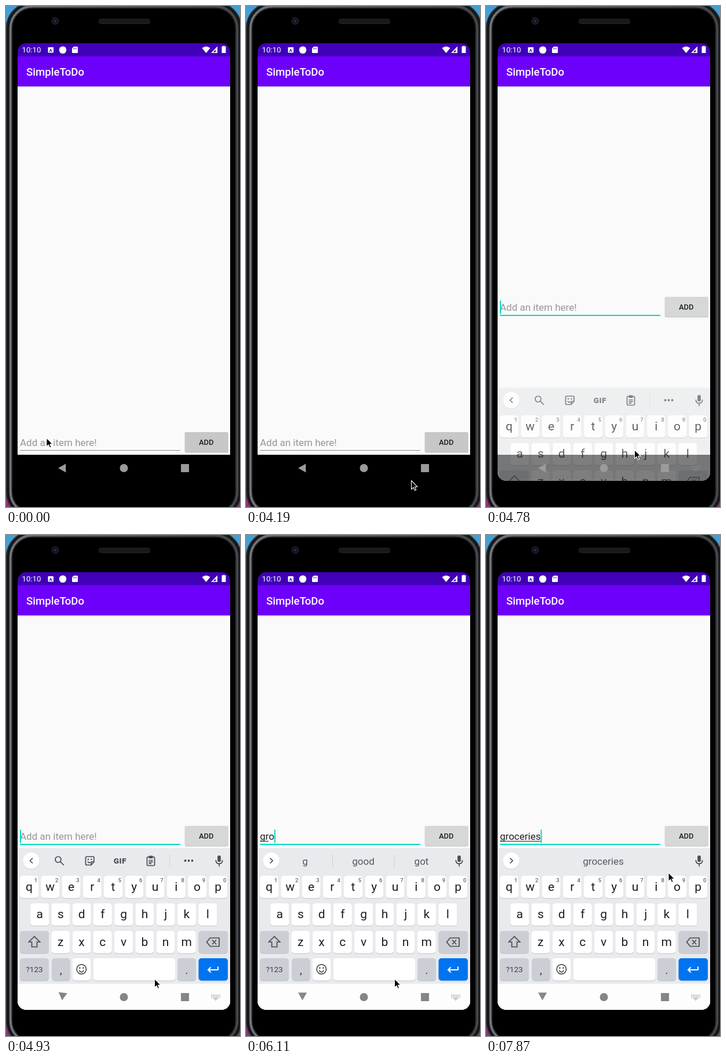
An HTML page for the animation above (8 s loop, 404 by 863 pixels).

```html
<!DOCTYPE html>
<html lang="en">
<head>
<meta charset="utf-8">
<title>To-do app</title>
<style>
  html, body { margin: 0; width: 100%; height: 100%; overflow: hidden; background: #000; }
  svg { display: block; width: 404px; height: 863px; }
  text { font-family: Roboto, Arial, sans-serif; white-space: pre; }
  .mid { text-anchor: middle; }
  .line { fill: none; stroke: #484c51; stroke-width: 1.7; }
</style>
</head>
<body>
<svg id="stage" viewBox="0 0 404 863"></svg>
<script>
const LOOP = 8000;

// [time, x, y]; no position means hidden
const pointerSteps = [
  [0, 70, 744], [300], [4190, 285.5, 817.5], [4340, 256.5, 764.5],
  [7580, 252, 731.5], [7730, 303, 639.5], [7870, 315, 581.5]
];

// [time, typed text, underlined letters, suggestions]
const typingSteps = [
  [0, '', 0],
  [5080, 'g', 0],
  [5380, 'g', 1, ['g', 'good', 'got']],
  [5670, '', 0],
  [5820, 'g', 0],
  [6110, 'gro', 2, ['g', 'good', 'got']],
  [6260, 'gro', 2, ['gr', 'green', 'great']],
  [6410, 'groc', 3, ['gro', 'group', 'gross']],
  [6550, 'groce', 4, ['groc', 'groceries', 'grocery']],
  [6700, 'grocer', 5, ['groc', 'groceries', 'grocery']],
  [6850, 'grocer', 5, ['groce', 'groceries', 'grocery']],
  [6990, 'groceri', 6, ['grocer', 'groceries', 'grocery']],
  [7140, 'grocerie', 7, ['groceri', 'groceries', '']],
  [7290, 'groceries', 8, ['grocerie', 'groceries', '']],
  [7440, 'groceries', 9, ['', 'groceries', '']]
];

// [time, focused, field lift, keyboard drop, keyboard opacity, back arrow angle]
const layoutSteps = [
  [0, false, 0, 0, 0, 0],
  [4480, true, 0, 0, 0, 0],
  [4780, true, -233, 118, 0.68, 0],
  [4930, true, -233, 0, 1, -84],
  [5080, true, -233, 0, 1, -90]
];

const rect = (x, y, w, h, fill, r = 0, more = '') =>
  `<rect x="${x}" y="${y}" width="${w}" height="${h}" rx="${r}" fill="${fill}" ${more}/>`;
const circle = (x, y, r, fill, more = '') =>
  `<circle cx="${x}" cy="${y}" r="${r}" fill="${fill}" ${more}/>`;
const path = (d, more = 'class="line"') => `<path d="${d}" ${more}/>`;
const label = (x, y, size, fill, str, more = 'class="mid"') =>
  `<text x="${x}" y="${y}" font-size="${size}" fill="${fill}" ${more}>${str}</text>`;

function phone() {
  const shell = (inset, color, width) => rect(inset, inset - 7, 407 - 2 * inset, 889 - 2 * inset,
    'none', 45 - inset, `stroke="${color}" stroke-width="${width}"`);
  return rect(0, 0, 404, 432, '#459fd5') + rect(0, 432, 404, 431, '#8a3672') +
    rect(0, -7, 407, 889, '#000', 45) +
    shell(0.8, '#37393c', 1.6) + shell(3.5, '#17181a', 4) +
    shell(7.7, 'url(#metal)', 4) + shell(10.6, '#25272a', 1.6) +
    circle(85, 26, 6.5, '#1c1d20') + circle(85, 26, 4, '#11121d') + circle(85, 26, 1.6, '#34398c') +
    rect(160.5, 22.5, 88, 8, '#171717', 3, 'stroke="#262626"') +
    path('M164 25.5H246M164 28H246', 'stroke="#222" stroke-dasharray="1.5 1.5"');
}

function appBars() {
  return path('M20 87V79A15 15 0 0 1 35 64H372A15 15 0 0 1 387 79V87Z', 'fill="#4100b7"') +
    rect(20, 86.5, 367, 52, '#6d00fb') + rect(20, 138.5, 367, 3, 'url(#shade)') +
    label(27.5, 80, 13.2, '#fff', '10:10', '') +
    rect(72.5, 71, 9.5, 9.5, '#fff', 1) + label(77.2, 79, 8, '#4100b7', 'A', 'class="mid" font-weight="700"') +
    circle(98, 75.7, 6.3, '#fff') +
    path('M117 70H123Q124 70 124 71V80Q124 81 123 81H115Q114 81 114 80V73Z', 'fill="#fff"') +
    path('M116.8 72.3V74.5M119 72.3V74.5M121.2 72.3V74.5', 'stroke="#4100b7"') +
    path('M338.5 72.5Q345.5 66.8 352.5 72.5L345.5 81Z', 'fill="#fff"') +
    path('M365 69.5V81H354Z', 'fill="#fff"') +
    path('M362 75.2V79.4H357.5Z', 'fill="#4100b7"') +
    path('M374.5 69.5V68.7H377.5V69.5H379.5V81H372.5V69.5Z', 'fill="#fff"') +
    label(35, 120, 18.6, '#fff', 'SimpleToDo', 'font-weight="500"');
}

function field() {
  return `<g id="field">
    ${rect(309, 736, 74.5, 33.5, '#000', 2, 'opacity=".22"')}
    ${rect(308.5, 734, 75, 34.5, '#c7c7c7', 2, 'id="button"')}
    ${label(345.8, 756, 13, '#1f1f1f', 'ADD', 'class="mid" font-weight="500"')}
    ${rect(24, 765, 277, 1, '#8d8d8d', 0, 'id="rule"')}
    ${label(24, 758, 17, '#969696', 'Add an item here!', 'id="hint"')}
    ${label(24, 758, 17, '#202020', '', 'id="typed"')}
    ${rect(24, 760, 0, 1, '#202020', 0, 'id="mark"')}
    ${rect(24, 740.5, 2, 23, '#03d9c6', 0, 'id="caret"')}
  </g>`;
}

const key = (x, y, w, fill = '#fff') => rect(x, y + 1, w, 38.5, '#bfc2c8', 5) + rect(x, y, w, 38.5, fill, 5);
const letters = (row, x, y) => [...row].map((c, i) =>
  key(x - 16 + i * 36.25, y, 32) + label(x + i * 36.25, y + 25.5, 21, '#1c1d1f', c)).join('');

function toolbar() {
  const dot = (x, y = 561, r = 1.9) => circle(x, y, r, '#484c51');
  return `<g id="tools">
    ${path('M46 556.5L41.5 561L46 565.5')}
    ${circle(90, 559, 5, 'none', 'class="line"')}${path('M93.7 562.7L100 569')}
    ${path('M152 556V563L147 568.5H139.5Q137.5 568.5 137.5 566.5V556Q137.5 554 139.5 554H150Q152 554 152 556ZM152 563H147V568M141 562.5Q143 565.5 145.5 564')}
    ${dot(142, 558.8, 1.2)}${dot(147.5, 558.8, 1.2)}
    ${label(197, 566, 13.5, '#484c51', 'GIF', 'class="mid" font-weight="900" letter-spacing=".6"')}
    ${rect(243.5, 554.5, 13, 15, 'none', 1.5, 'class="line"')}
    ${rect(246.5, 552.5, 7, 4.5, '#484c51', 1)}
    ${path('M246.5 560.5H253.5M246.5 563.3H253.5M246.5 566.2H251')}
    ${rect(282, 550, 1, 23, '#d2d5d9')}
    ${dot(309.5)}${dot(315.5)}${dot(321.5)}
  </g>`;
}

function keyboard() {
  const mute = '#cbced4';
  const hints = [...'1234567890'].map((n, i) =>
    label(51.5 + i * 36.25, 598, 9.5, '#5f6368', n, 'class="mid" font-weight="500"')).join('');
  return `<g clip-path="url(#screen)">
  ${rect(20, 773, 367, 45, '#fafafa', 0, 'id="navBase"')}
  <g id="keyboard">
    ${rect(20, 539.5, 367, 300, '#e8eaed')}
    ${circle(43.5, 562, 14, '#d3d6da')}${circle(43.5, 561, 14, '#fff')}
    ${toolbar()}
    <g id="words">
      ${path('M41.5 556.5L46 561L41.5 565.5')}
      <g id="bars">${rect(149, 550, 1, 23, '#cdd0d5')}${rect(255.5, 550, 1, 23, '#cdd0d5')}</g>
      ${[102, 202.5, 303].map(x => label(x, 568, 17, '#54585d', '', 'class="mid slot"')).join('')}
    </g>
    ${rect(365.2, 552, 5.6, 11, '#484c51', 2.8)}
    ${path('M362.3 560Q362.3 566.3 368 566.3Q373.7 566.3 373.7 560M368 566V571')}
    ${letters('qwertyuiop', 40, 587)}${hints}
    ${letters('asdfghjkl', 58.2, 634.5)}
    ${letters('zxcvbnm', 94.3, 682)}
    ${key(24, 682, 50, mute)}${path('M49 691.5L39.5 701H44.5V709.5H53.5V701H58.5Z')}
    ${key(332.5, 682, 50.5, mute)}${path('M352.5 694H368V708.5H352.5L346.5 701.2ZM356 697.5L363 705M363 697.5L356 705')}
    ${key(24, 729, 50, mute)}${label(49, 753, 13.5, '#3b3e42', '?123')}
    ${key(79, 729, 31.5, mute)}${label(94.8, 756, 19, '#333', ',')}
    ${key(114.5, 729, 32)}${circle(130.3, 748, 8.2, 'none', 'class="line"')}
    ${circle(127.3, 745.8, 1.3, '#484c51')}${circle(133.3, 745.8, 1.3, '#484c51')}${path('M126 750Q130.3 755.5 134.6 750')}
    ${key(150.7, 729, 141.5)}
    ${key(296, 729, 32, mute)}${label(312, 756, 19, '#333', '.')}
    ${key(332.5, 729, 50.5, '#0073f0')}
    ${path('M366 743.5V749H349M353.5 744.5L349 749L353.5 753.5', 'fill="none" stroke="#fff" stroke-width="2"')}
  </g>
  ${rect(20, 773, 367, 45, '#fdfdfd', 0, 'id="navBack"')}</g>`;
}

function navBar() {
  const dots = [0, 1, 2, 3, 4, 5].map(i =>
    rect(354.3 + i * 2.8, 792, 1.5, 1.5, '#8d8d8d') + rect(354.3 + i * 2.8, 795, 1.5, 1.5, '#8d8d8d')).join('');
  return `<g id="nav" fill="#9b9b9b">
    <path id="back" d="M90 796L103.3 788.5V803.5Z"/>
    <circle cx="203.5" cy="796" r="7"/>
    <rect x="302" y="789" width="14" height="14" rx="1"/>
    <g id="keysIcon">${dots}${rect(358, 798, 8, 1.2, '#8d8d8d')}${path('M360.5 800.5H363.5L362 802Z', 'fill="#8d8d8d"')}</g>
  </g>`;
}

const $ = id => document.getElementById(id);
$('stage').innerHTML = `<defs>
  <linearGradient id="metal"><stop offset="0" stop-color="#73767b"/><stop offset="1" stop-color="#48494c"/></linearGradient>
  <linearGradient id="shade" x2="0" y2="1"><stop stop-color="#000" stop-opacity=".11"/><stop offset="1" stop-color="#000" stop-opacity="0"/></linearGradient>
  <clipPath id="screen"><path d="M20 500H387V803A15 15 0 0 1 372 818H35A15 15 0 0 1 20 803Z"/></clipPath>
</defs>` + phone() + rect(20, 138, 367, 635, '#fafafa') + appBars() + field() + keyboard() + navBar() +
  path('M0 0V15L3.5 11.8L5.8 17L8.2 16L6 10.8H10.6Z',
    'id="pointer" fill="#000" stroke="#fff" stroke-width="1.1" stroke-linejoin="round"');

const slots = document.querySelectorAll('.slot');
const set = (id, attrs) => { for (const k in attrs) $(id).setAttribute(k, attrs[k]); };
const show = (id, on) => set(id, { visibility: on ? 'visible' : 'hidden' });
const stepAt = (steps, t) => steps.findLast(s => s[0] <= t);

function drawPointer([, x, y]) {
  show('pointer', x !== undefined);
  if (x !== undefined) set('pointer', { transform: `translate(${x} ${y})` });
}

function drawLayout([, focused, lift, drop, opacity, angle]) {
  const open = opacity > 0, settled = opacity === 1;
  set('field', { transform: `translate(0 ${lift})` });
  set('rule', focused ? { height: 2, fill: '#03d9c6' } : { height: 1, fill: '#8d8d8d' });
  set('button', { fill: open ? '#d6d7d7' : '#c7c7c7' });
  show('caret', focused);
  show('navBase', open);
  set('keyboard', { transform: `translate(0 ${drop})`, opacity, display: open ? 'inline' : 'none' });
  set('navBack', { fill: settled ? '#fdfdfd' : '#000', opacity: settled ? 1 : 0.5, display: open ? 'inline' : 'none' });
  set('nav', { fill: settled ? '#858585' : '#9b9b9b' });
  set('back', { transform: `rotate(${angle} 96.5 795)` });
  show('keysIcon', open);
}

function drawTyping([, text, marked, words]) {
  const typed = $('typed');
  typed.textContent = text;
  show('hint', !text);
  set('mark', { width: marked ? typed.getSubStringLength(0, marked) : 0 });
  set('caret', { x: 24 + (text ? typed.getComputedTextLength() : 0) });
  set('tools', { display: words ? 'none' : 'inline' });
  set('words', { display: words ? 'inline' : 'none' });
  set('bars', { display: words && words[0] ? 'inline' : 'none' });
  slots.forEach((slot, i) => { slot.textContent = words ? words[i] : ''; });
}

function frame() {
  const t = performance.now() % LOOP;
  drawPointer(stepAt(pointerSteps, t));
  drawLayout(stepAt(layoutSteps, t));
  drawTyping(stepAt(typingSteps, t));
  requestAnimationFrame(frame);
}
frame();
</script>
</body>
</html>
```
